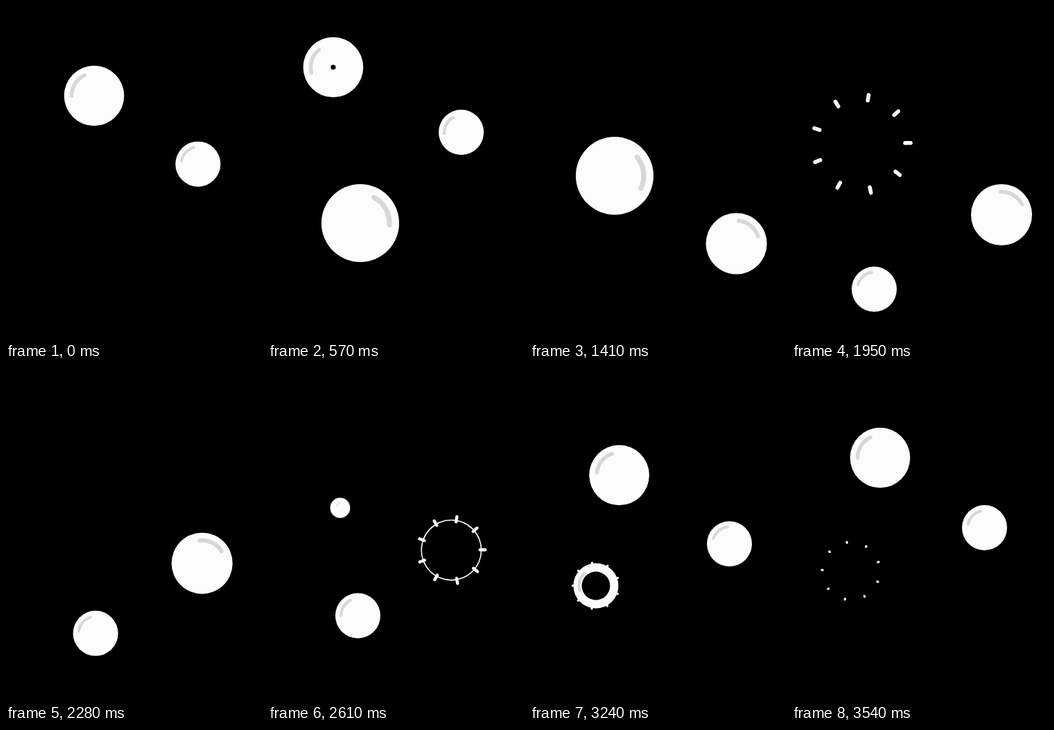
An HTML page with a canvas for the animation above (3.57 s loop, 369 px wide and 480 px high).

```html
<!DOCTYPE html>
<html>
<head>
<meta charset="utf-8">
<style>
html, body { margin: 0; width: 100%; height: 100%; overflow: hidden; background: #000; }
canvas { display: block; }
</style>
</head>
<body>
<canvas id="stage" width="369" height="480"></canvas>
<script>
const ctx = document.getElementById('stage').getContext('2d');
const LOOP = 3570, STEP = 30;
const GROW = 246, POP = 1580, BURST = 400, HOLE = 110;
const WHITE = '#fcfcfc', SHADE = '#d8d8d8';

// path: [age in ms, x, y]; shine: start angle in degrees and turn per ms;
// hold: pause at the loop seam
const bubbles = [
  { born: 2515, r: 43.3, flip: true, shine: [204.5, -.0243], hold: STEP,
    path: [[0, 98, 208], [95, 104, 201], [395, 118, 180], [750, 129, 152],
           [1025, 127, 129], [1595, 94, 88], [1980, 87, 62]] },
  { born: 2985, r: 32.5, flip: true, shine: [204.5, -.0243],
    path: [[0, 303, 270], [285, 286, 250.5], [555, 277.5, 229.5], [800, 273, 210],
           [1155, 278.5, 181.5], [1655, 309, 146], [1980, 317, 123]] },
  { born: 100, r: 56, shine: [-74, .0262],
    path: [[0, 112, 349], [95, 118, 342], [470, 133, 312], [850, 139, 282],
           [1310, 122, 244], [1520, 109, 227], [1850, 99.7, 198.4], [1980, 99, 188]] },
  { born: 918, r: 44, shine: [-76.7, -.0148],
    path: [[0, 274, 379], [162, 285, 367], [492, 297.5, 341.5], [832, 308, 316],
           [1032, 302, 300], [1692, 264.3, 261.7], [1980, 260, 242]] },
  { born: 1585, r: 32.5, flip: true, shine: [204.5, -.0243],
    path: [[0, 100, 435], [365, 118.5, 407], [790, 131, 374], [1025, 129.5, 356],
           [1325, 113.5, 336], [1655, 95, 313], [1955, 85, 291.7], [1980, 85, 290]] }
];

const rad = deg => deg * Math.PI / 180;
const clamp = v => Math.min(1, Math.max(0, v));

// Smooth curve through the path points
function along(path, age, axis) {
  let i = 0;
  while (i < path.length - 2 && age > path[i + 1][0]) i++;
  const slope = k => {
    const a = path[Math.max(0, k - 1)], b = path[Math.min(path.length - 1, k + 1)];
    return (b[axis] - a[axis]) / (b[0] - a[0]);
  };
  const p = path[i], q = path[i + 1], span = q[0] - p[0];
  const u = clamp((age - p[0]) / span), v = 1 - u;
  return p[axis] * v * v * (1 + 2 * u) + q[axis] * u * u * (3 - 2 * u)
    + span * u * v * (slope(i) * v - slope(i + 1) * u);
}

function disc(r, color) {
  ctx.fillStyle = color;
  ctx.beginPath();
  ctx.arc(0, 0, r, 0, 2 * Math.PI);
  ctx.fill();
}

function drawBody(b, age) {
  const u = clamp(age / GROW), size = u * u * (3 - 2 * u);
  disc(b.r * size, WHITE);
  const shineSize = b.r * size ** 1.5, start = b.shine[0] + b.shine[1] * age;
  ctx.strokeStyle = SHADE;
  ctx.lineWidth = shineSize * .13;
  ctx.beginPath();
  ctx.arc(0, 0, shineSize * .75, rad(start), rad(start + 65));
  ctx.stroke();
}

function drawRays(b, q) {
  const inner = b.r * (.8 + .49 * q);
  const outer = b.r * (.8 + .49 * (1 - (1 - q) ** 3));
  if (b.flip) ctx.scale(-1, 1);
  ctx.rotate(rad(-2 * q));
  ctx.strokeStyle = WHITE;
  ctx.lineWidth = b.r * .1;
  ctx.beginPath();
  for (let i = 0; i < 9; i++) {
    ctx.moveTo(inner, 0);
    ctx.lineTo(outer, 0);
    ctx.rotate(rad(40));
  }
  ctx.stroke();
}

function drawBubble(b, time) {
  let age = time - b.born;
  if (age < 0) age += LOOP - (b.hold || 0);
  const popped = age - POP;
  if (popped >= BURST) return;
  ctx.save();
  ctx.translate(along(b.path, age, 1), along(b.path, age, 2));
  const hole = clamp((popped - 6) / HOLE);
  if (hole < 1) drawBody(b, age);
  if (hole > 0 && hole < 1) disc(b.r * hole, '#000');
  if (popped > 40) drawRays(b, popped / BURST);
  ctx.restore();
}

function draw() {
  const time = Math.floor(performance.now() % LOOP / STEP) * STEP;
  ctx.fillStyle = '#000';
  ctx.fillRect(0, 0, 369, 480);
  ctx.lineCap = 'round';
  bubbles.forEach(b => drawBubble(b, time));
  requestAnimationFrame(draw);
}
draw();
</script>
</body>
</html>
```
